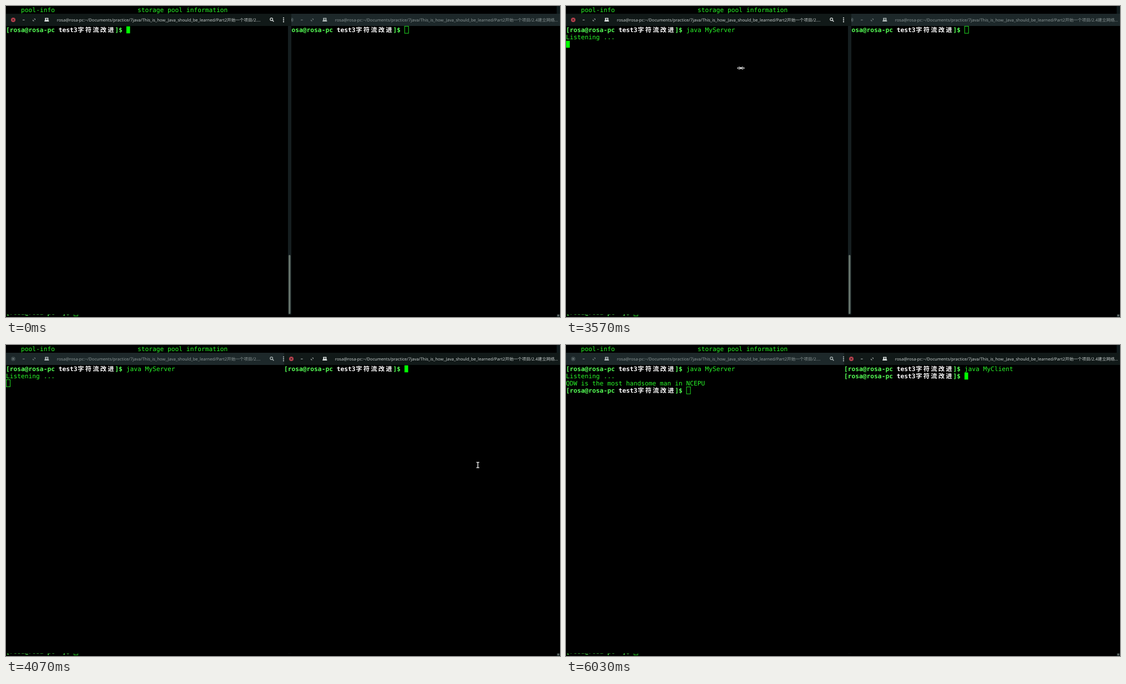
An HTML page that plays this animation: 998x561 px, repeating every 6360 ms.

```html
<!DOCTYPE html>
<html lang="zh-CN">
<head>
<meta charset="utf-8">
<title>Terminals</title>
<style>
html, body { margin: 0; width: 100%; height: 100%; overflow: hidden; background: #000; }
svg { display: block; width: 998px; height: 561px; }
text { white-space: pre; text-rendering: geometricPrecision; }
.mono { font: 11.245px 'DejaVu Sans Mono', monospace; fill: #28f528; }
.bold { font-weight: bold; fill: #55ff55; }
.cjk { font: bold 11.245px 'Noto Sans CJK SC', 'Noto Sans CJK JP', 'Noto Sans CJK', sans-serif; fill: #fff; }
.title { font: 7.58px 'Noto Sans', 'Noto Sans CJK SC', 'Noto Sans CJK JP', sans-serif; }
</style>
</head>
<body>
<svg id="stage" viewBox="0 0 998 561"></svg>
<script>
const LOOP = 6360, CELL = 6.77, ROW = 13;
const CLICK = 3880, FADE = 200;
const USER = 'rosa', HOST = 'rosa-pc';
const DIR = '~/Documents/practice/7java/This_is_how_Java_should_be_learned/Part2开始一个项目/';
const stage = document.getElementById('stage');

function set(node, attrs) {
  for (const k in attrs) node.setAttribute(k, attrs[k]);
  return node;
}
function add(parent, tag, attrs = {}, content) {
  const node = set(document.createElementNS('http://www.w3.org/2000/svg', tag), attrs);
  if (content !== undefined) node.textContent = content;
  parent.appendChild(node);
  return node;
}
const rect = (p, x, y, width, height, fill) => add(p, 'rect', { x, y, width, height, fill });
const show = (node, on) => set(node, { visibility: on ? 'visible' : 'hidden' });
const between = (t, a, b) => t >= a && t < b;
const ease = u => 1 - (1 - u) * (1 - u);
const clamp = u => Math.min(1, Math.max(0, u));
const mix = (a, b, k) => `rgb(${a.map((v, i) => Math.round(v + (b[i] - v) * k))})`;

// Text on the character grid; x0 and y0 are the grid's corner.
function write(p, x0, y0, col, row, str, cls = 'mono') {
  return add(p, 'text', { class: cls, x: x0 + col * CELL, y: y0 + row * ROW + 10.5 }, str);
}
function prompt(p, x0, y0, row) {
  const g = add(p, 'g');
  write(g, x0, y0, 0, row, `[${USER}@${HOST}`, 'mono bold');
  write(g, x0, y0, 14, row, 'test3', 'mono bold').style.fill = '#fff';
  [...'字符流改进'].forEach((c, i) => write(g, x0 + 0.5, y0, 19 + 2 * i, row, c, 'cjk'));
  write(g, x0, y0, 29, row, ']$', 'mono bold');
  return g;
}

function makeWindow(x0, width, title, full) {
  const g = add(stage, 'g');
  rect(g, x0, 36, width, 520.5, '#000');
  const bar = rect(g, x0, 14, full ? 514 : width, 22, '#000');
  const disc = add(g, 'circle', { cx: x0 + 13, cy: 25, r: 4 });
  const cross = add(g, 'path', { d: `M${x0 + 11.5} 23.5l3 3m0 -3l-3 3`, 'stroke-width': 0.9 });
  const marks = add(g, 'path', {
    d: `M${x0 + 30} 25.2h3.6M${x0 + 48.7} 24.8v2h2M${x0 + 50.6} 23.3h1.8v1.9`,
    fill: 'none', 'stroke-width': 0.9
  });
  const tab = add(g, 'path', {
    d: `M${x0 + 70.3} 21.5h6v4.6h1v1.9h-8v-1.9h1zM${x0 + 72.9} 22.4v1.1h-1.1v1h1.1v1.1h1v-1.1h1.1v-1h-1.1v-1.1z`,
    'fill-rule': 'evenodd'
  });
  const label = add(g, 'text', { class: 'title', x: x0 + 91.7, y: 27.6 }, title);
  const tools = add(g, 'g');
  if (full) {
    add(tools, 'circle', { cx: 478.2, cy: 24, r: 2.3, fill: 'none', 'stroke-width': 1.2 });
    add(tools, 'path', { d: 'M480 25.8l2.4 2.4', 'stroke-width': 1.4 });
    for (const cy of [21.6, 25, 28.4])
      add(tools, 'circle', { cx: 500, cy, r: 1.15, 'stroke-width': 0 });
    rect(g, 508, 36, 6, 520.5, '#151e20');
    add(g, 'rect', { x: 509.2, y: 449, width: 3.2, height: 106.5, rx: 1.6, fill: '#6a776e' });
  }
  prompt(g, x0, 36.5, 0);
  const cursor = add(g, 'rect');
  return {
    g, x0, cursor,
    focus(k) {
      const ink = mix([139, 150, 150], [198, 205, 204], k);
      const icon = mix([178, 187, 187], [222, 227, 226], k);
      set(bar, { fill: mix([29, 40, 42], [17, 25, 24], k) });
      set(disc, { fill: mix([59, 71, 73], [181, 64, 77], k) });
      set(cross, { stroke: mix([125, 135, 136], [28, 26, 28], k) });
      set(marks, { stroke: ink });
      set(tab, { fill: icon });
      set(label, { fill: ink });
      set(tools, { fill: icon, stroke: icon });
    },
    place(col, row, active, on) {
      const x = x0 + col * CELL, y = 36.5 + row * ROW;
      set(cursor, active
        ? { x: x + 0.2, y: y + 0.2, width: 6.6, height: 12.6, fill: '#00ff00', stroke: 'none' }
        : { x: x + 0.5, y: y + 0.1, width: 7, height: 12.6, fill: 'none', stroke: '#22dd22' });
      show(cursor, !active || on);
    }
  };
}

// Terminal behind the two windows
rect(stage, 0, 0, 998, 561, '#000');
write(stage, 0, 0.5, 4, 0, 'pool-info');
write(stage, 0, 0.5, 35, 0, 'storage pool information');
write(stage, 0, 0.5, 0, 42, `[${USER}@${HOST} ~]$`, 'mono bold');
add(stage, 'rect', { x: 122.4, y: 547, width: 7, height: 12, fill: 'none', stroke: '#22dd22' });
rect(stage, 992, 0, 6, 561, '#0f191b');
add(stage, 'rect', { x: 993.2, y: 550, width: 3.4, height: 10, rx: 1.6, fill: '#626c68' });

const path = `${USER}@${HOST}:${DIR}`;
const right = makeWindow(501, 497, path + '2.4建立网络…', false);
const left = makeWindow(0, 508, path + '2.…', true);

const timed = [];
const from = (start, node) => timed.push([start, node]);
from(1970, write(left.g, 0, 36.5, 32, 0, 'java MyServer'));
from(3170, write(left.g, 0, 36.5, 0, 1, 'Listening ...'));
from(4900, write(left.g, 0, 36.5, 0, 2, 'QDW is the most handsome man in NCEPU'));
from(4900, prompt(left.g, 0, 36.5, 3));
from(4470, write(right.g, 501, 36.5, 32, 0, 'java MyClient'));
from(4900, prompt(right.g, 501, 36.5, 1));

// Mouse pointer: text beam and resize shape
const pointer = add(stage, 'g');
const beam = add(pointer, 'g', { fill: 'none' });
for (const [stroke, w] of [['#333', 2.6], ['#e8e8e8', 1.2]])
  add(beam, 'path', { d: 'M-2.5 -4.8h1.7l.8 .7l.8 -.7h1.7M0 -4.1v8.2M-2.5 4.8h1.7l.8 -.7l.8 .7h1.7', stroke, 'stroke-width': w });
const resize = add(pointer, 'g', { fill: '#222', stroke: '#d8d8d8', 'stroke-width': 1 });
add(resize, 'path', { d: 'M-6.6 0l4.2 -2.3v4.6zM6.6 0l-4.2 -2.3v4.6z' });
add(resize, 'circle', { r: 1.4, fill: '#e8e8e8' });

function movePointer(t) {
  const near = ease(clamp((t - 930) / 270));
  const far = clamp((t - 3600) / 230);
  const u = far * far * (3 - 2 * far);
  const x = t < 3000 ? 285 + 30 * near : 315 + 535 * u;
  const y = t < 3000 ? 121 - 9 * near : 112 + 104.5 * u;
  set(pointer, { transform: `translate(${x.toFixed(2)} ${y.toFixed(2)})` });
  const seen = between(t, 930, 1970) || between(t, 3430, 4470);
  const sizing = between(t, 3540, 3600);
  show(beam, seen && !sizing);
  show(resize, seen && sizing);
}

function draw(t) {
  const clicked = t >= CLICK;
  const k = ease(clamp((t - CLICK) / FADE));
  left.focus(1 - k);
  right.focus(k);
  const top = clicked ? right : left, under = clicked ? left : right;
  if (under.g.nextSibling !== top.g) stage.insertBefore(under.g, top.g);

  for (const [start, node] of timed) show(node, t >= start);

  const dark = between(t, 600, 1200) || between(t, 1800, 1970) ||
    between(t, 2570, 3000) || between(t, 3600, CLICK);
  const [col, row] = t < 1970 ? [32, 0] : t < 3000 ? [46, 0] :
    t < 3170 ? [0, 1] : t < 4900 ? [0, 2] : [32, 3];
  left.place(col, row, !clicked, !dark);

  const [rcol, rrow] = t < 4470 ? [32, 0] : t < 4730 ? [45, 0] : t < 4900 ? [0, 1] : [32, 1];
  right.place(rcol, rrow, clicked, !between(t, 5330, 5700));
  movePointer(t);
}

let begin;
function tick(now) {
  if (begin === undefined) begin = now;
  draw((now - begin) % LOOP);
  requestAnimationFrame(tick);
}
draw(0);
requestAnimationFrame(tick);
</script>
</body>
</html>
```
